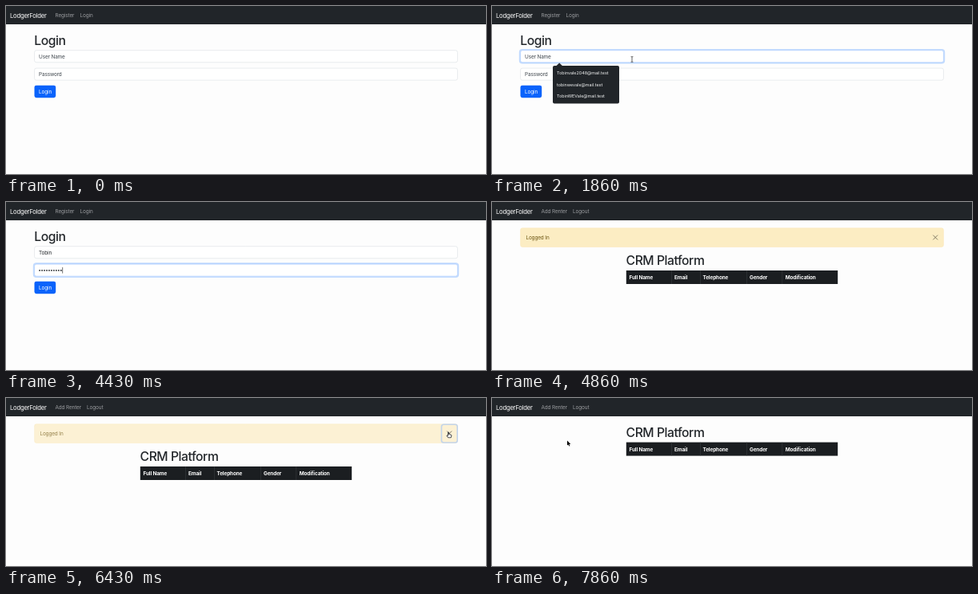
Write an HTML page with a canvas that moves like this. It is 600 by 211 pixels and loops after 8000 ms.

```html
<!DOCTYPE html>
<html lang="en">
<head>
<meta charset="utf-8">
<title>Login demo</title>
<style>
  html, body { margin: 0; width: 100%; height: 100%; overflow: hidden; background: #fdfdfd; }
  canvas { display: block; width: 600px; height: 211px; }
</style>
</head>
<body>
<canvas id="stage"></canvas>
<script>
const W = 600, H = 211, LOOP = 8000, TICK = 1000 / 7;
const canvas = document.getElementById('stage');
const ctx = canvas.getContext('2d');
const ratio = window.devicePixelRatio || 1;
canvas.width = Math.round(W * ratio);
canvas.height = Math.round(H * ratio);

const BRAND = 'LodgerFolder';
const USER = 'Tobin';
const EMAILS = ['Tobinvale2048@mail.test', 'tobinwevale@mail.test', 'TobinWEVale@mail.test'];
const INK = '#212529';

// Pointer keys: tick, shape, x, y. Each holds until the next one.
const POINTER = [
  [0, 'none', 0, 0],
  [1, 'arrow', 253, 158], [2, 'arrow', 205, 128], [3, 'arrow', 140, 86],
  [4, 'arrow', 78, 46], [5, 'arrow', 34, 21], [6, 'hand', 13, 13], [7, 'hand', 22, 12],
  [9, 'arrow', 88, 36], [10, 'beam', 175, 67], [14, 'none', 0, 0],
  [37, 'arrow', 178, 66], [38, 'arrow', 210, 55], [39, 'arrow', 253, 43],
  [40, 'arrow', 350, 39], [41, 'arrow', 470, 32], [42, 'arrow', 545, 27],
  [43, 'hand', 553, 43], [47, 'arrow', 440, 52], [48, 'arrow', 315, 65],
  [50, 'arrow', 250, 73], [51, 'arrow', 193, 80], [54, 'arrow', 140, 66], [55, 'arrow', 94, 53.5]
];

// Ticks at which each password dot appears.
const DOT_TICKS = [21, 23, 25, 25, 26, 27, 27, 28, 30, 31];

function text(str, x, y, color, size = 6.4, weight = 400, spacing = -0.12) {
  ctx.font = `${weight} ${size}px Inter, "Liberation Sans", sans-serif`;
  ctx.letterSpacing = spacing + 'px';
  ctx.fillStyle = color;
  ctx.fillText(str, x, y);
}

function rect(x, y, w, h, color) {
  ctx.fillStyle = color;
  ctx.fillRect(x, y, w, h);
}

function box(x, y, w, h, r, fill, stroke, line = 0.5) {
  ctx.beginPath();
  ctx.roundRect(x, y, w, h, r);
  if (fill) { ctx.fillStyle = fill; ctx.fill(); }
  if (stroke) { ctx.strokeStyle = stroke; ctx.lineWidth = line; ctx.stroke(); }
}

function polygon(points, fill) {
  ctx.beginPath();
  points.forEach(([x, y]) => ctx.lineTo(x, y));
  ctx.closePath();
  ctx.fillStyle = fill;
  ctx.fill();
}

function navbar(links) {
  rect(0, 0, W, 23, INK);
  text(BRAND, 5, 14.5, '#fff', 7.7, 400, -0.25);
  links.forEach(([label, x]) => text(label, x, 14.1, '#9b9da0'));
}

function heading(str, x, y) {
  text(str, x, y, INK, 15.7, 500, -0.45);
}

function input(y, focus) {
  if (focus) {
    ctx.globalAlpha = focus;
    box(34.6, y - 0.8, 530.8, 17.1, 3.2, null, '#c3dbfe', 1.6);
    ctx.globalAlpha = 1;
  }
  box(35.6, y + 0.2, 528.8, 15.1, 2.4, '#fff', focus ? '#86b7fe' : '#d3d8dd');
}

function caret(x, y) {
  rect(x, y, 0.6, 7.6, '#111');
}

function suggestions() {
  polygon([[80, 75.5], [84.2, 71.5], [88.4, 75.5]], INK);
  box(76, 75, 83, 47.5, 2, INK);
  EMAILS.forEach((mail, i) => text(mail, 81, 86 + 14.7 * i, '#f4f5f5', 5.4, 400, 0));
}

function loginPage(tick) {
  navbar([['Register', 61.5], ['Login', 92.5]]);
  heading('Login', 35.3, 48.6);

  const userFocus = tick < 11 ? 0 : tick < 19 ? 1 : tick < 20 ? 0.4 : 0;
  const passFocus = tick < 19 ? 0 : tick < 20 ? 0.6 : 1;
  input(55.5, userFocus);
  input(77.9, passFocus);

  const typed = USER.slice(0, Math.max(0, tick - 13));
  text(typed || 'User Name', 41, 65.7, typed ? INK : '#3f464d');
  if (tick >= 11 && tick < 19 && tick !== 13) {
    caret(41 + (typed ? ctx.measureText(typed).width : 0), 59.6);
  }

  const dots = DOT_TICKS.filter(n => n <= tick).length;
  if (!dots) text('Password', 41, 88, '#3f464d');
  ctx.fillStyle = INK;
  for (let i = 0; i < dots; i++) {
    ctx.beginPath();
    ctx.arc(42.1 + 2.97 * i, 85.9, 0.9, 0, 7);
    ctx.fill();
  }
  if (tick >= 20) caret(40.8 + 2.97 * dots, 82);

  box(35.5, 99.7, 26.7, 15.5, 2.4, '#0a63fb');
  text('Login', 41, 110, '#fff');

  if (tick >= 11 && tick < 19) suggestions();
}

function alertBar(tick) {
  ctx.globalAlpha = tick < 45 ? 1 : tick < 46 ? 0.7 : 0.25;
  box(35.6, 32.7, 528.8, 23.8, 2.4, '#fcedc3', '#fae5b3');
  text('Logged In', 42.4, 46.8, '#69530f');
  const pressed = tick >= 44;
  if (pressed) box(544.4, 33.2, 19.8, 22.8, 2.8, null, '#a9c8f4', 1.6);
  ctx.strokeStyle = pressed ? '#222' : '#766f5c';
  ctx.lineWidth = 0.9;
  ctx.beginPath();
  ctx.moveTo(551.3, 41.6); ctx.lineTo(557.1, 47.4);
  ctx.moveTo(557.1, 41.6); ctx.lineTo(551.3, 47.4);
  ctx.stroke();
  ctx.globalAlpha = 1;
}

function rosterPage(tick) {
  navbar([['Add Renter', 61.5], ['Logout', 101]]);
  const open = tick < 47;
  if (open) alertBar(tick);
  const top = open ? 86 : 55.6;
  heading('CRM Platform', 167.6, top - 7);
  rect(167.8, top, 264.4, 17, '#1b1e21');
  [224.3, 260, 318.5, 362.6].forEach(x => rect(x, top, 0.5, 17, '#3b3f43'));
  const columns = [['Full Name', 171.5], ['Email', 228], ['Telephone', 263.5], ['Gender', 322], ['Modification', 366.7]];
  columns.forEach(([label, x]) => text(label, x, top + 11, '#fff', 6.4, 700));
}

function outlined(path) {
  ctx.lineJoin = 'round';
  ctx.strokeStyle = '#fff';
  ctx.fillStyle = '#000';
  ctx.lineWidth = 0.9;
  ctx.stroke(path);
  ctx.fill(path);
}

const arrow = new Path2D('M0 0V6.1L1.4 4.9L2.4 7.1L3.4 6.7L2.4 4.5H4.3Z');
const hand = new Path2D('M-.5 0Q0-.6.5 0V2.6L3.4 3.3Q4 3.5 3.8 4.4L3.2 6.8H-.4L-2.2 4.3Q-1.8 3.5-.5 4.4Z');

function pointer(tick) {
  const [, shape, x, y] = POINTER.filter(key => key[0] <= tick).pop();
  if (shape === 'none') return;
  ctx.save();
  ctx.translate(x, y);
  if (shape === 'arrow') outlined(arrow);
  else if (shape === 'hand') {
    outlined(hand);
    ctx.fillStyle = '#fff';
    ctx.fill(hand);
    ctx.strokeStyle = '#222';
    ctx.lineWidth = 0.7;
    ctx.stroke(hand);
  } else {
    rect(-0.35, -3.2, 0.7, 6.4, '#222');
    rect(-1.5, -3.5, 3, 0.6, '#222');
    rect(-1.5, 2.9, 3, 0.6, '#222');
  }
  ctx.restore();
}

function draw(now) {
  const tick = Math.floor(((now % LOOP) + 4) / TICK) % 56;
  ctx.setTransform(ratio, 0, 0, ratio, 0, 0);
  rect(0, 0, W, H, '#fdfdfd');
  if (tick < 34) loginPage(tick);
  else rosterPage(tick);
  pointer(tick);
}

let start;
function loop(now) {
  start ??= now;
  draw(now - start);
  requestAnimationFrame(loop);
}
draw(0);
requestAnimationFrame(loop);
</script>
</body>
</html>
```
